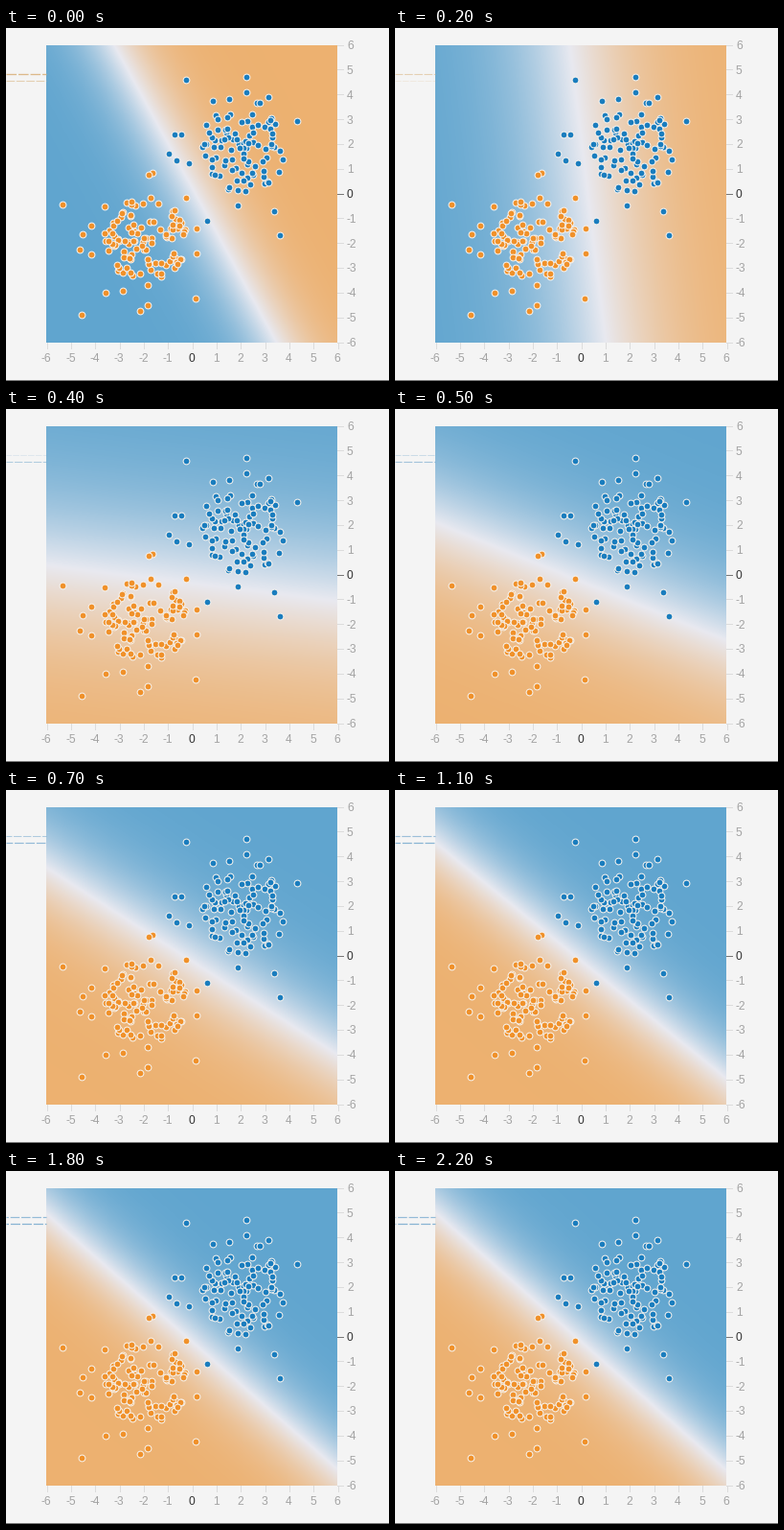
Recreate the animation shown at these times as a matplotlib script. Size 400 px wide and 368 px high, loop 2.3 s.

```python
import numpy as np
import matplotlib.pyplot as plt
from matplotlib.animation import FuncAnimation
from matplotlib.colors import LinearSegmentedColormap

W, H, DPI = 400, 368, 100
PX = 72 / DPI
LEFT, RIGHT, TOP, BOTTOM = 42, 346, 18, 328
FRAMES, STEP = 23, 100
ORANGE, BLUE = "#f0912a", "#1a7dbe"
FIELD = LinearSegmentedColormap.from_list(
    "field", ["#edb170", "#e8e9f0", "#60a5cf"], N=512)
BIAS = 0.08


def sx(v):
    return (LEFT + RIGHT) / 2 + v * (RIGHT - LEFT) / 12


def sy(v):
    return (TOP + BOTTOM) / 2 - v * (BOTTOM - TOP) / 12


def relax(start, end, tau, step):
    """Gradient descent settling exponentially on its optimum."""
    return end + (start - end) * np.exp(-step / tau)


def weights(i):
    step = max(0, i - 1)
    return relax(-0.52, 0.40, 3.3, step), relax(-0.29, 0.46, 2.4, step)


def cluster(center, spread, count, seed, outliers):
    """Seeded round cloud, denser in the middle, plus a few stray points."""
    rng = np.random.default_rng(seed)
    angle = rng.uniform(0, 2 * np.pi, count)
    radius = rng.uniform(0, 1, count) ** 0.65
    cloud = np.column_stack([np.cos(angle), np.sin(angle)])
    cloud = center + cloud * radius[:, None] * spread
    return np.vstack([cloud, outliers]) + 1


fig = plt.figure(figsize=(W / DPI, H / DPI), dpi=DPI, facecolor="#f4f4f4")
ax = fig.add_axes([0, 0, 1, 1])
ax.axis("off")

gx, gy = np.meshgrid(np.linspace(-6, 6, RIGHT - LEFT),
                     np.linspace(6, -6, BOTTOM - TOP))
field = ax.imshow(np.zeros_like(gx), cmap=FIELD, vmin=-1, vmax=1,
                  extent=(LEFT, RIGHT, BOTTOM, TOP), aspect="auto",
                  interpolation="nearest", zorder=1)
ax.set_xlim(0, W)
ax.set_ylim(H, 0)

for v in range(-6, 7):
    ink = "#333333" if v == 0 else "#a3a3a3"
    tick = "#777777" if v == 0 else "#dcdcdc"
    x, y = sx(v), sy(v) - 0.5
    ax.plot([RIGHT, RIGHT + 6], [y, y], color=tick, lw=PX)
    ax.plot([x + .5] * 2, [BOTTOM, BOTTOM + 6], color="#dcdcdc", lw=PX)
    style = dict(color=ink, fontsize=12 * PX, family="Liberation Sans",
                 va="center_baseline")
    ax.text(RIGHT + 10, y, str(v), ha="left", **style)
    ax.text(x, 344, str(v), ha="center", **style)

ax.plot([0, W], [366.5] * 2, color="#777777", lw=PX)

links = [ax.plot([0, LEFT], [y, y], dash_capstyle="butt")[0]
         for y in (47.5, 54.5)]

orange = cluster((144, 221), (44, 46), 104, 4, [
    (58, 183), (79, 214), (76, 230), (88, 205), (88, 235), (78, 298),
    (103, 275), (121, 273), (139, 294), (147, 288), (197, 281),
    (102, 185), (152, 150), (148, 152), (187, 176), (198, 208), (198, 234)])
blue = cluster((246, 124), (46, 46), 90, 7, [
    (187, 53), (250, 50), (250, 66), (215, 75), (232, 73), (273, 71),
    (261, 77), (264, 77), (303, 96), (175, 110), (182, 110), (169, 130),
    (177, 137), (190, 140), (241, 184), (279, 190), (285, 215), (209, 200)])
for pts, color in ((orange, ORANGE), (blue, BLUE)):
    ax.scatter(pts[:, 0], pts[:, 1], s=(6.8 * PX) ** 2, c=color,
               edgecolors="#f7f3ee", linewidths=PX, zorder=3)


def draw(i):
    wx, wy = weights(i)
    field.set_data(np.tanh(wx * gx + wy * gy + BIAS))
    for link, w in zip(links, (wx, wy)):
        link.set_color("#d9b27c" if w < 0 else "#6ca3cb")
        link.set_alpha(min(1, 0.15 + 1.4 * abs(w)))
        link.set_linewidth((0.8 + abs(w)) * PX)
        link.set_linestyle((i / 3, (8, 1.5)))
    return [field, *links]


anim = FuncAnimation(fig, draw, frames=FRAMES, interval=STEP,
                     repeat=True, repeat_delay=0, blit=False)
plt.show()
```
